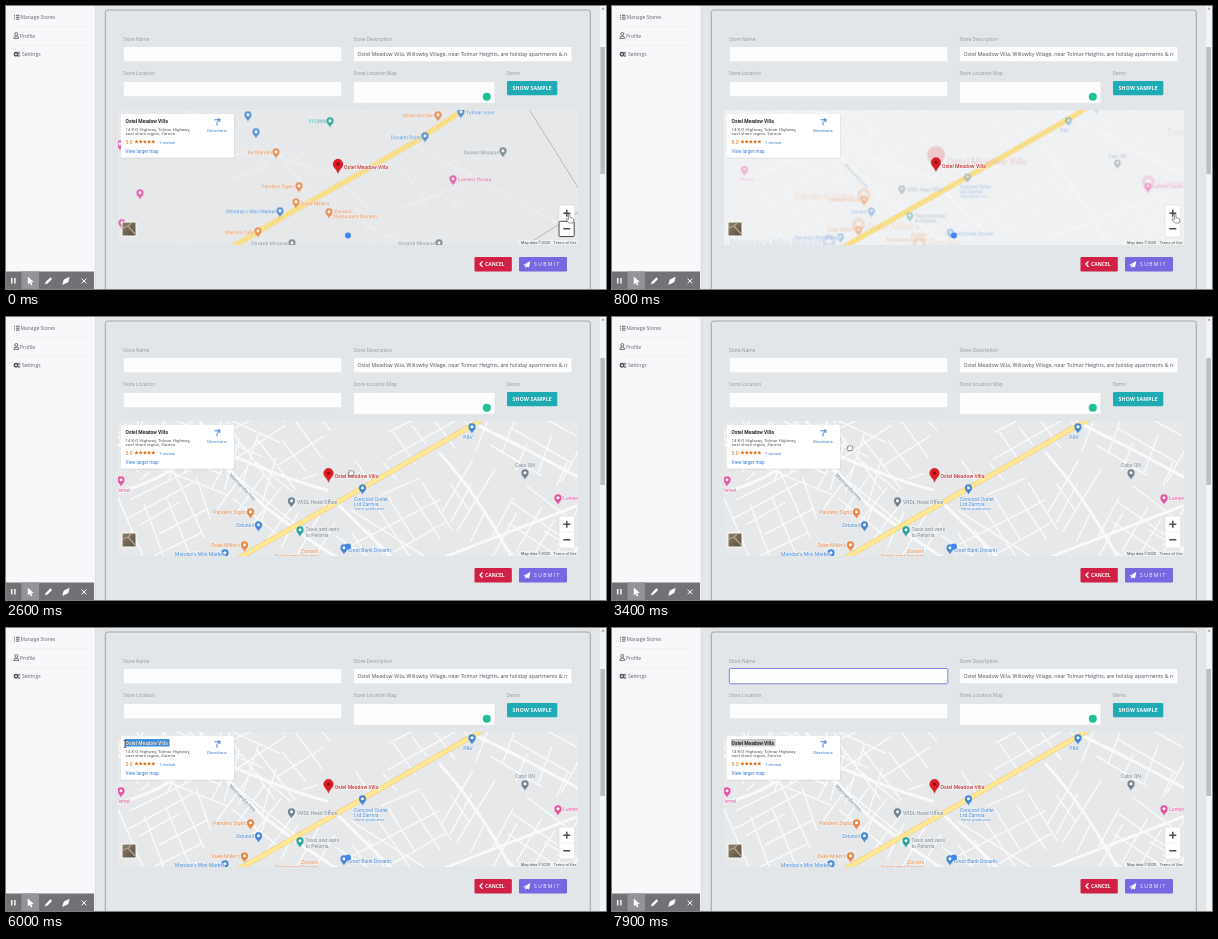
Recreate the animation shown at these times as an HTML page. Size 600x283 px, loop 8 s.

```html
<!DOCTYPE html>
<html lang="en">
<head>
<meta charset="utf-8">
<title>Store form</title>
<style>
  html, body { margin: 0; width: 100%; height: 100%; overflow: hidden; }
  svg { display: block; width: 100vw; height: 100vh; }
  .ui { font-family: "Open Sans", sans-serif; }
  .map { font-family: Roboto, sans-serif; }
</style>
</head>
<body>
<svg viewBox="0 0 600 283" id="stage">
  <defs>
    <clipPath id="mapClip"><path d="M112 104H572V239H112Z"/></clipPath>
    <clipPath id="descClip"><path d="M350 41H561.5V55H350Z"/></clipPath>
    <clipPath id="selClip"><rect id="selClipBox" y="111" height="7.5"/></clipPath>
    <linearGradient id="photo" x2="1" y2="1">
      <stop stop-color="#8c8168"/><stop offset="1" stop-color="#594d45"/>
    </linearGradient>
    <path id="marker" d="M0 0C-.8 -4 -4.8 -5.2 -4.8 -9.2A4.8 4.8 0 0 1 4.8 -9.2C4.8 -5.2 .8 -4 0 0Z"/>
  </defs>
  <rect width="600" height="283" fill="#e2e6e9"/>

  <g id="sidebar" class="ui" font-size="5" fill="#5c626a">
    <rect width="89" height="283" fill="#f8f8fa"/>
    <path d="M89.2 0V283" stroke="#d6dbde" stroke-width=".6"/>
    <path d="M8 20.5H82M8 39.5H82" stroke="#eceef0" stroke-width=".6"/>
    <path d="M8 9.3h1M10 9.3h3.6M8 11.2h1M10 11.2h3.6M8 13.1h1M10 13.1h3.6" stroke="#4b5159" stroke-width=".9"/>
    <circle cx="10.3" cy="28" r="1.5" fill="none" stroke="#4b5159" stroke-width=".8"/>
    <path d="M7.9 32.4q0-2.4 2.4-2.4t2.4 2.4z" fill="none" stroke="#4b5159" stroke-width=".8"/>
    <circle cx="10" cy="48.3" r="1.7" fill="none" stroke="#4b5159" stroke-width="1.5"/>
    <circle cx="13" cy="46.8" r=".8" fill="none" stroke="#4b5159" stroke-width=".7"/>
    <circle cx="13" cy="49.8" r=".8" fill="none" stroke="#4b5159" stroke-width=".7"/>
    <text x="14.5" y="13">Manage Stores</text>
    <text x="14" y="31.8">Profile</text>
    <text x="16" y="50.2">Settings</text>
  </g>

  <rect x="99.3" y="4" width="485" height="285" rx="2.5" fill="none" stroke="#989da3" stroke-width=".9"/>
  <path d="M594 0H600V283H594Z" fill="#f3f4f5"/>
  <path d="M595.5 3.5l1.5-2 1.5 2z" fill="#8b8e91"/>
  <path d="M594.3 41H599V168H594.3Z" fill="#bcbec0"/>

  <g id="form" class="ui" font-size="4.8" fill="#90969e">
    <text x="117" y="34.5">Store Name</text>
    <text x="347.5" y="34.5">Store Description</text>
    <text x="117" y="69.3">Store Location</text>
    <text x="347.5" y="69.3">Store Location Map</text>
    <text x="500.5" y="69.3">Demo</text>
    <g fill="#fdfdfe" stroke="#dadee2" stroke-width=".6">
      <rect id="nameInput" x="117.3" y="40.5" width="218.5" height="15.3" rx="1.5"/>
      <rect x="347.5" y="40.5" width="218.5" height="15.3" rx="1.5"/>
      <rect x="117.3" y="75.4" width="218.5" height="15.3" rx="1.5"/>
      <rect x="347.5" y="75.4" width="141.5" height="21.8" rx="1.5"/>
    </g>
    <text x="351.5" y="50" font-size="5.25" fill="#4d535c" clip-path="url(#descClip)">Ostel Meadow Villa, Willowby Village, near Tolmar Heights, are holiday apartments &amp; rooms</text>
    <circle cx="480.8" cy="90.7" r="4" fill="#1fbf98"/>
    <rect x="501" y="75" width="50.3" height="14.3" rx="1.2" fill="#1fabb3"/>
    <text x="526.2" y="84" text-anchor="middle" font-size="5.1" font-weight="700" letter-spacing=".2" fill="#fff">SHOW SAMPLE</text>
    <rect x="468.5" y="251" width="37.3" height="14.4" rx="1.2" fill="#d02046"/>
    <path d="M476.5 255.4l-2.5 2.7 2.5 2.7" fill="none" stroke="#fff" stroke-width="1.3"/>
    <text x="479" y="260" font-size="5" font-weight="700" fill="#fff">CANCEL</text>
    <rect x="513" y="251" width="48" height="14.4" rx="1.2" fill="#7768e2"/>
    <path d="M517.3 259l7-4-1.3 6.6-2.2-1.1-1.4 1.6-.1-2.5 3.6-3.1-4.3 2.9z" fill="#fff"/>
    <text x="528" y="260" font-size="5" letter-spacing="1.4" fill="#fff">SUBMIT</text>
  </g>

  <g class="map" clip-path="url(#mapClip)">
    <rect x="112" y="104" width="460" height="135" fill="#e6e8ea"/>
    <g id="streets"></g>
    <rect id="veil" x="112" y="104" width="460" height="135" fill="#fff"/>
    <g id="highway"></g>
    <g id="farLabels"></g>
    <g id="nearLabels"></g>
    <g id="place">
      <use href="#marker" fill="#e11b22" stroke="#a3191e" stroke-width=".4"/>
      <circle cy="-9.2" r="1.7" fill="#7f1217"/>
      <text x="6" y="-4" font-size="5.1" font-weight="500" fill="#bd3030" stroke="#fff" stroke-width=".9" paint-order="stroke">Ostel Meadow Villa</text>
    </g>
    <circle cx="342" cy="229.5" r="3" fill="#4285f4"/>
    <path d="M512 234H572V239H512Z" fill="#f3f4f5" opacity=".75"/>
    <g font-size="3.9" fill="#4b4d50">
      <text x="515" y="238">Map data ©2020</text>
      <text x="547.5" y="238">Terms of Use</text>
    </g>
    <rect x="115.5" y="215.5" width="15" height="15" rx="1" fill="#fff"/>
    <rect x="116.5" y="216.5" width="13" height="13" fill="url(#photo)"/>
    <path d="M117 222l5-2 7 8M122 220l3-3" stroke="#b7a888" stroke-width="1.2" fill="none"/>
    <rect x="553" y="199" width="15.7" height="32" rx="1.3" fill="#fff" stroke="#ccd0d3" stroke-width=".5"/>
    <path d="M555 215H567" stroke="#e2e4e6" stroke-width=".6"/>
    <path d="M557.3 207.2h7M560.8 203.7v7M557.3 222.8h7" stroke="#4a4d50" stroke-width="1.5"/>
    <rect id="minusFocus" x="553" y="215.3" width="15.2" height="15.2" rx="1.2" fill="none" stroke="#4a4c4f" stroke-width="1"/>
  </g>

  <g class="map" id="card">
    <rect x="115" y="108.6" width="113.5" height="44" rx="1" fill="#8a8f94" opacity=".25"/>
    <rect x="115" y="108" width="113" height="43.8" rx="1" fill="#fff"/>
    <rect id="selection" y="111" height="7.5"/>
    <g font-size="4.9" font-weight="700">
      <text x="119.5" y="116.5" fill="#25272a">Ostel Meadow Villa</text>
      <text id="selText" x="119.5" y="116.5" fill="#fff" clip-path="url(#selClip)">Ostel Meadow Villa</text>
    </g>
    <g font-size="4.4" fill="#55585d">
      <text x="119.5" y="124.6">14 K-O Highway, Tolmar Highway,</text>
      <text x="119.5" y="129.4">east shore region, Zarmia</text>
    </g>
    <text x="119.5" y="137.6" font-size="5" fill="#df7419">5.0</text>
    <g id="stars" fill="#e7711b"></g>
    <g font-size="4.4" fill="#3777d8">
      <text x="153" y="137.6">1 review</text>
      <text x="119.5" y="147.3" font-size="4.6">View larger map</text>
      <text x="211" y="126" text-anchor="middle">Directions</text>
    </g>
    <path d="M208.5 113.8h4.4M211 119.5v-3l3-3.2M213.8 116v-3h-2" fill="none" stroke="#3b7ddd" stroke-width="1"/>
  </g>

  <g id="toolbar" fill="none" stroke="#fff">
    <path d="M0 265.5H88V283H0Z" fill="#707275" stroke="none"/>
    <path d="M15.5 265.5H33V283H15.5Z" fill="#929497" stroke="none"/>
    <path d="M5.7 272v5.5M8.9 272v5.5" stroke-width="1.4"/>
    <path d="M21.8 270.5v8l2-1.8 1.2 2.7 1.4-.7-1.2-2.5 2.6-.2z" fill="#fff" stroke="none"/>
    <path d="M39.2 278l1-2.2 4.2-4.2 1.4 1.4-4.2 4.2z" fill="#fff" stroke-width=".5"/>
    <path d="M56.8 278.3l1.3-4.5 5-2.4-1.2 4.5z" fill="#fff" stroke-width=".8"/>
    <path d="M75.6 272.5l4.8 4.8M80.4 272.5l-4.8 4.8" stroke-width="1"/>
  </g>

  <circle id="ring" r="12" fill="none" stroke="#d93a4c" stroke-width="1.1"/>
  <path id="pointHand" d="M-1.5 -3.5q.8-.8 1.5 0v3l3.2 1q.9.4.7 1.5l-.7 3h-4.4l-2.8-4q.7-1 2.5.3z" fill="#fff" stroke="#505357" stroke-width=".6"/>
  <path id="openHand" d="M-2 2.7l-1.2-2.6q.4-1 1.2 0l-.1-2q.8-.9 1.2 0 .7-1.2 1.4 0 .8-.8 1.2.2 1-.5 1 .5v2l-.7 1.9z" fill="#fff" stroke="#45484d" stroke-width=".6"/>
  <path id="beam" d="M-1.4 -3.5H1.4M0 -3.5V3.5M-1.4 3.5H1.4" fill="none" stroke="#3d4046" stroke-width=".7"/>
</svg>
<script>
const $ = id => document.getElementById(id);
const set = (id, attrs) => { for (const k in attrs) $(id).setAttribute(k, attrs[k]); };
const show = (id, on) => $(id).setAttribute("visibility", on ? "visible" : "hidden");
const ramp = (t, a, b) => Math.min(1, Math.max(0, (t - a) / (b - a)));
const smooth = p => p * p * (3 - 2 * p);
const mix = (a, b, p) => a + (b - a) * p;

const LOOP = 8000;
const ORANGE = "#e98744", BLUE = "#4688d8", PINK = "#e753a2", GREY = "#73838f", TEAL = "#25a29a";

// Street blocks: irregular grids turned to follow the main roads.
let seed = 17;
const rnd = () => (seed = (seed * 16807) % 2147483647) / 2147483647;

function block(cx, cy, w, h, angle, step) {
  let d = "";
  for (let x = -w; x <= w; x += step * (.7 + rnd() * .6)) {
    const start = mix(-h, 0, rnd());
    d += `M${x.toFixed(1)} ${start.toFixed(1)}L${(x + rnd() * 5).toFixed(1)} ${mix(h * .2, h, rnd()).toFixed(1)}`;
  }
  for (let y = -h; y <= h; y += step * (1 + rnd() * .6)) {
    const start = mix(-w, 0, rnd());
    d += `M${start.toFixed(1)} ${y.toFixed(1)}L${mix(w * .2, w, rnd()).toFixed(1)} ${(y + rnd() * 5).toFixed(1)}`;
  }
  return `<path d="${d}" transform="translate(${cx} ${cy}) rotate(${angle})"/>`;
}

$("streets").innerHTML = `<g fill="none" stroke="#f9fafb" stroke-width="1.5">
  ${block(190, 132, 85, 42, 22, 20)}${block(278, 135, 55, 45, -35, 21)}
  ${block(165, 205, 55, 42, 65, 17)}${block(250, 185, 48, 32, 38, 19)}
  ${block(410, 128, 60, 25, -30, 20)}${block(395, 210, 70, 38, -30, 20)}
  ${block(510, 215, 75, 45, 32, 15)}${block(530, 137, 60, 36, 27, 20)}
  ${block(30, 180, 90, 130, 20, 26)}${block(660, 180, 100, 120, 30, 25)}
  ${block(300, 50, 200, 48, -25, 28)}${block(410, 290, 180, 48, 32, 24)}
  <path stroke-width="3" d="M190 96L222 153 258 189 300 220 345 250 480 320M464 104L520 132 580 164 800 285M112 175Q170 160 202 120M330 185L385 239M433 135Q470 175 505 239M440 239L572 188M112 128Q180 118 233 141T322 173"/>
  </g>`;

const road = "M-140 460L120 307 236 239 356 171 473 104 566 43 700 -45";
const line = (width, color, extra = "") =>
  `<path d="${road}" stroke="${color}" stroke-width="${width}" vector-effect="non-scaling-stroke" ${extra}/>`;
$("highway").innerHTML = `<g fill="none" stroke-linejoin="round">
  <path id="border" d="M706 39L806 199M806 241L698 309" stroke="#b9a6ad" stroke-width="1.6"/>
  ${line(5.2, "#ecd07a")}${line(4, "#ffe796")}
  ${line(1.6, "#d3b343", 'id="hatch" stroke-dasharray="1 1.2"')}</g>`;

const label = (x, y, color, text, anchor = "start", size = 5.1) =>
  `<text x="${x}" y="${y}" fill="${color}" font-size="${size}" text-anchor="${anchor}" stroke="#f4f5f6" stroke-width=".8" paint-order="stroke">${text}</text>`;
const spot = (x, y, color) =>
  `<use href="#marker" transform="translate(${x} ${y + 6.5}) scale(.75)" fill="${color}"/><circle cx="${x}" cy="${y - .5}" r="1.5" fill="#fff"/>`;

$("nearLabels").innerHTML =
  spot(466, 110, BLUE) + label(462, 122, BLUE, "P&amp;V", "middle") +
  spot(519, 156, GREY) + label(519, 150, GREY, "Cabs QN", "middle") +
  spot(285.5, 184, GREY) + label(291, 187, GREY, "VRDL Head Office") +
  spot(356.5, 171, BLUE) + label(348, 183.3, BLUE, "Concord Outlet") + label(348, 188.8, BLUE, "Ltd Zarmia") +
  label(349, 193, BLUE, "Home goods store", "start", 3.6) +
  spot(294, 213, TEAL) + label(299.5, 214.2, GREY, "Taxis and vans") + label(299.5, 220, GREY, "to Pelorna") +
  spot(244.5, 195, ORANGE) + label(240, 197, ORANGE, "Pandero Signs", "end") +
  spot(252.5, 208, BLUE) + label(248, 210, BLUE, "Zelunoil", "end") +
  spot(238.5, 228, ORANGE) + label(234, 230, ORANGE, "Duke Miller's", "end") +
  spot(219, 236, BLUE) + label(169, 238.3, BLUE, "Monday's Mini Market") +
  spot(338, 231, BLUE) + label(342, 234.5, BLUE, "Crest Bank Dovanti") +
  label(295, 235.5, ORANGE, "Zorvani") + label(269, 241, ORANGE, "Restaurant Dovanti") +
  spot(115, 163, PINK) + label(110, 174.5, PINK, "Tamrel", "start", 4.6) +
  spot(552, 181, PINK) + label(557, 183, PINK, "Lumero House") +
  `<g transform="translate(223 158) rotate(46)">${label(0, 0, GREY, "Marovandia Hwy", "start", 4.8)}</g>`;

$("farLabels").innerHTML =
  spot(324, 115, TEAL) + label(320, 117, TEAL, "VTOWN", "end") +
  spot(242, 109, BLUE) + spot(250, 126, BLUE) +
  spot(270, 146, ORANGE) + label(266, 148, ORANGE, "Ke Merolin", "end") +
  spot(293, 180, ORANGE) + label(288, 182, ORANGE, "Pandero Signs", "end") +
  spot(290, 196, ORANGE) + label(295, 198.5, ORANGE, "Duke Miller's") +
  spot(274, 205, BLUE) + label(270, 207, BLUE, "Monday's Mini Market", "end") +
  spot(323, 206, ORANGE) + label(328, 207, ORANGE, "Zorvani") + label(328, 212, ORANGE, "Restaurant Dovanti") +
  spot(252, 225, ORANGE) + label(248, 227.5, ORANGE, "Merolin Cafe", "end") +
  spot(419, 130, BLUE) + label(415, 132.5, BLUE, "Dovanti Point", "end") +
  spot(432, 109, ORANGE) + label(428, 111, ORANGE, "Moon Kitchen", "end") +
  spot(455, 106, BLUE) + label(460, 108, BLUE, "Tolmar town") +
  spot(447, 173, PINK) + label(452, 175, PINK, "Lumero House") +
  spot(497, 145, GREY) + label(493, 147.5, GREY, "Dovant Mosque", "end") +
  spot(134, 187, PINK) + spot(114, 138, PINK) + spot(116, 217, PINK) +
  spot(286, 237, GREY) + label(282, 239, GREY, "Dovanti Mosque", "end") +
  spot(433, 237, GREY) + label(429, 239, GREY, "Dovanti Mosque", "end") +
  `<use href="#marker" transform="translate(332 167)" fill="#e11b22"/>` + label(338, 163, "#bd3030", "Ostel Meadow Villa");

$("stars").innerHTML = [0, 1, 2, 3, 4].map(i => {
  const points = Array.from({ length: 10 }, (_, k) => {
    const r = k % 2 ? .95 : 2.2, a = (k * 36 - 90) * Math.PI / 180;
    return `${(130.5 + i * 4.2 + r * Math.cos(a)).toFixed(2)},${(135.8 + r * Math.sin(a)).toFixed(2)}`;
  });
  return `<polygon points="${points}"/>`;
}).join("");

// Pointer stops: time, x, y.
const stops = [
  [0, 564, 212], [1000, 564, 212], [1700, 350, 157], [2500, 350, 157],
  [3300, 238, 131], [3700, 238, 131], [4450, 163, 115], [4600, 163, 115],
  [4900, 139, 115], [5300, 119, 116], [6400, 119, 116], [6950, 186, 47], [LOOP, 186, 47]
];
function pointerAt(t) {
  const i = Math.max(1, stops.findIndex(s => s[0] > t));
  const [a, b] = [stops[i - 1], stops[i]];
  const p = smooth(ramp(t, a[0], b[0]));
  return [mix(a[1], b[1], p), mix(a[2], b[2], p)];
}

function drawMap(t) {
  const p = smooth(ramp(t, 500, 900)), scale = mix(.5, 1, p);
  const x = mix(332, 322.5, p), y = mix(167.3, 165.3, p);
  const near = `translate(${x} ${y}) scale(${scale}) translate(-322.5 -165)`;
  for (const id of ["streets", "highway", "nearLabels"]) set(id, { transform: near });
  set("farLabels", {
    transform: `translate(${x} ${y}) scale(${scale * 2}) translate(-332 -167)`,
    opacity: Math.min(.9, (1 - p) * 1.2)
  });
  const settled = ramp(t, 900, 1200);
  set("nearLabels", { opacity: .55 * p + .45 * settled });
  set("streets", { opacity: mix(.35, 1, settled) });
  set("veil", { opacity: .4 * ramp(t, 500, 800) * (1 - settled) });
  set("hatch", { opacity: .65 * (1 - settled) });
  set("border", { opacity: 1 - p });
  set("place", { transform: `translate(${x} ${y})` });
  show("minusFocus", t < 500);
}

function draw(t) {
  drawMap(t);
  const [x, y] = pointerAt(t);
  const focused = t >= 7050;
  const left = Math.max(119, x), width = t < 4600 ? 0 : t < 5300 ? Math.max(0, 163.5 - left) : 44.5;
  const selX = 163.5 - width;
  set("selection", { x: selX, width, fill: focused ? "#c6c8ca" : "#3b8ee0" });
  set("selClipBox", { x: selX, width });
  show("selText", !focused);
  set("nameInput", { stroke: focused ? "#8b80e4" : "#dadee2", "stroke-width": focused ? 1 : .6 });

  const at = `translate(${x} ${y})`;
  for (const id of ["pointHand", "openHand", "beam", "ring"]) set(id, { transform: at });
  show("pointHand", t < 1050);
  show("openHand", t >= 1050 && t < 4200);
  show("beam", t >= 4200 && t < 7400);
  show("ring", (t >= 4550 && t < 5500) || (t >= 7000 && t < 7250));
}

const begin = performance.now();
function tick() {
  draw((performance.now() - begin) % LOOP);
  requestAnimationFrame(tick);
}
tick();
</script>
</body>
</html>
```
